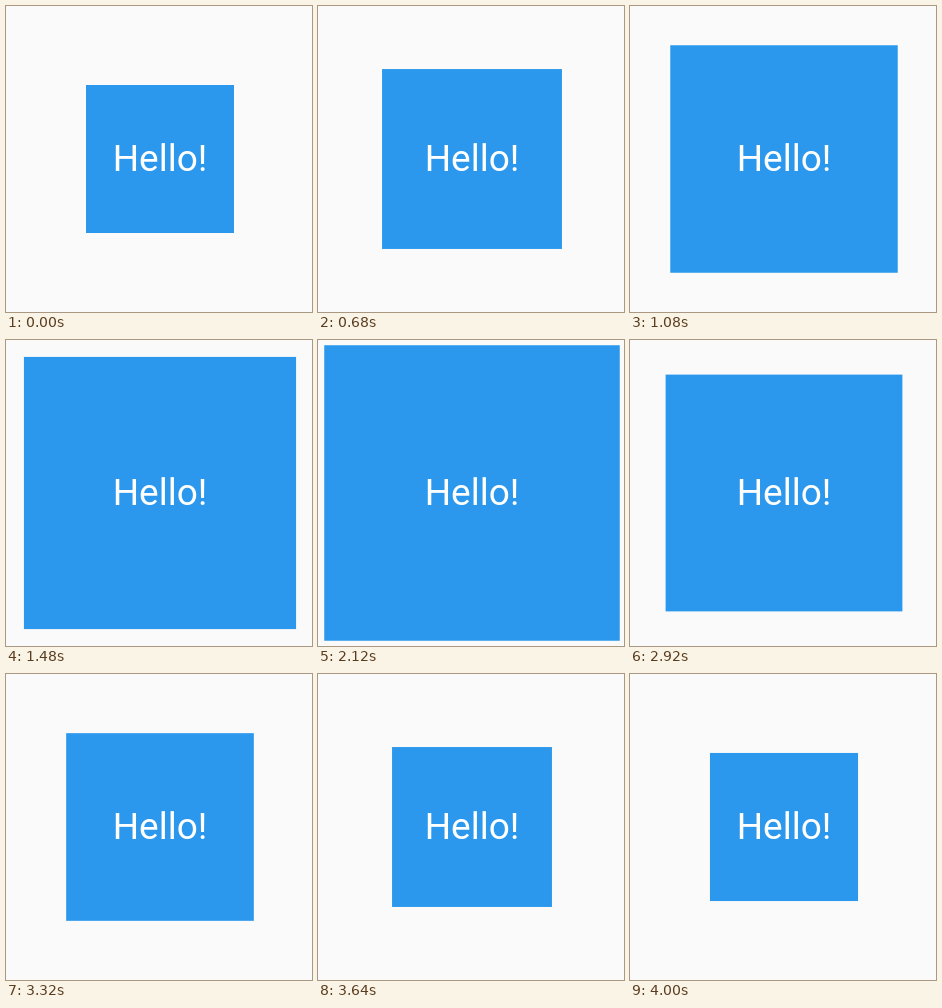
Animation, 306 px wide and 306 px high, one loop 4.04 s. Source, as an HTML page:

```html
<!DOCTYPE html>
<html lang="en">
<head>
<meta charset="utf-8">
<title>Growing box</title>
<style>
  html, body { margin: 0; width: 100%; height: 100%; overflow: hidden; background: #fafafa; }
  svg { display: block; width: 100%; height: 100%; }
  text { font: 37px Roboto, sans-serif; fill: #fff; text-anchor: middle; }
</style>
</head>
<body>
<svg viewBox="0 0 306 306">
  <rect id="box" fill="#2b98ed"/>
  <text x="154" y="165">Hello!</text>
</svg>
<script>
const LOOP = 4040, DELAY = 37, HALF = 2000;
const CX = 154, CY = 153, MIN = 148, MAX = 296;
const box = document.getElementById('box');

// cubic-bezier(.42, 0, .58, 1), solved for its parameter by bisection
function easeInOut(x) {
  let lo = 0, hi = 1;
  for (let i = 0; i < 24; i++) {
    const s = (lo + hi) / 2, r = 1 - s;
    if (1.26 * s * r * r + 1.74 * s * s * r + s * s * s < x) lo = s;
    else hi = s;
  }
  return lo * lo * (3 - 2 * lo);
}

function draw(now) {
  const t = now % LOOP - DELAY;
  const p = Math.max(0, 1 - Math.abs(t / HALF - 1));
  const size = MIN + (MAX - MIN) * easeInOut(p);
  box.setAttribute('x', CX - size / 2);
  box.setAttribute('y', CY - size / 2);
  box.setAttribute('width', size);
  box.setAttribute('height', size);
}

let start;
function tick(now) {
  start ??= now;
  draw(now - start);
  requestAnimationFrame(tick);
}
draw(0);
requestAnimationFrame(tick);
</script>
</body>
</html>
```
